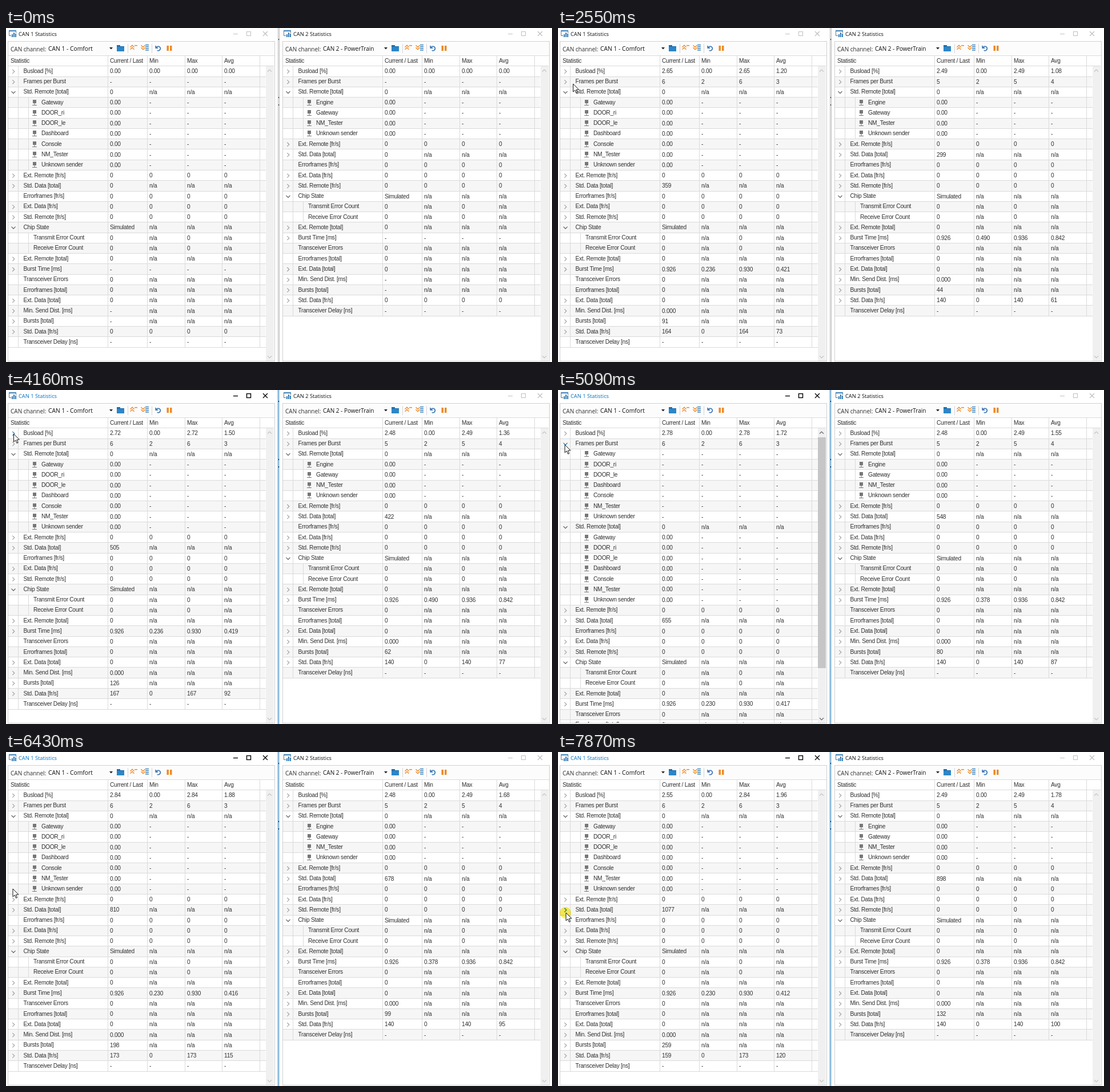
These frames come from a looping animation (956 by 586 pixels, 8000 ms). An HTML page with a canvas:

```html
<!DOCTYPE html>
<html>
<head>
<meta charset="utf-8">
<title>CAN Statistics</title>
<style>
html, body { margin: 0; width: 956px; height: 586px; overflow: hidden; background: #fff; }
canvas { display: block; }
</style>
</head>
<body>
<canvas id="stage" width="956" height="586"></canvas>
<script>
const ctx = document.getElementById('stage').getContext('2d');
const LOOP = 8000, ROW = 18.27, TOP = 48;
const BLUE = '#0072c6', ORANGE = '#f08a24', LINE = '#dadada';
const TABLE_FONT = '10.2px "Liberation Sans", Arial, sans-serif';
const uiFont = size => `${size}px "Open Sans", "Noto Sans", sans-serif`;

// Values arrive once per period; the measurement is stopped during the last one
const FIRST_UPDATE = 300, PERIOD = 1030, RATE_SAMPLES = 7, STOP = 7.65;
// Sample numbers at which load and rate change direction
const KEYS = [1, 2, 3, 6, 7];

// Counters are [value at sample 2, speed, acceleration]
const channels = [
  {
    x: 0, title: 'CAN 1 Statistics', name: 'CAN 1 - Comfort', nameSize: 10.3,
    nodes: ['Gateway', 'DOOR_ri', 'DOOR_le', 'Dashboard', 'Console', 'NM_Tester', 'Unknown sender'],
    load: [0, 2.144, 2.654, 2.844, 2.554], rate: [0, 129, 164, 173, 159],
    total: [218, 138.7, 2.35], bursts: [57, 33.8, .35],
    frames: [6, 2, 6, 3], burst: { max: .93, min: [.236, .23], avg: [.423, .412] }
  },
  {
    x: 481, title: 'CAN 2 Statistics', name: 'CAN 2 - PowerTrain', nameSize: 10,
    nodes: ['Engine', 'Gateway', 'NM_Tester', 'Unknown sender'],
    load: [0, 1.85, 2.487, 2.48, 2.487], rate: [0, 103, 140, 140, 140],
    total: [179, 118.5, 1.55], bursts: [27, 16.9, .3],
    frames: [5, 2, 5, 4], burst: { max: .936, min: [.49, .378], avg: [.842, .842] }
  }
];

const clicks = [[3170, 3230], [4090, 4160], [4950, 5090], [5500, 5640], [6720, 6860], [7190, 7260], [7870, 8000]];
const expanded = { load: [3430, 4160], frames: [5090, 5570], remote: [6860, 7260] };
const pointerStart = [300, 558];
const moves = [
  { from: 1810, to: 2550, x: 26.5, y: 98 },
  { from: 2620, to: 2950, x: 13.5, y: 77 },
  { from: 4360, to: 4880, x: 12, y: 96 },
  { from: 5880, to: 6570, x: 12, y: 257 },
  { from: 7560, to: 7800, x: 14, y: 282 }
];

const within = (t, [a, b]) => t >= a && t < b;
const clamp01 = v => Math.min(1, Math.max(0, v));
const mix = (a, b, u) => a + (b - a) * u;
const same = v => [v, v, v, v];
const na = v => [v, 'n/a', 'n/a', 'n/a'];

function rect(color, x, y, w, h) {
  ctx.fillStyle = color;
  ctx.fillRect(x, y, w, h);
}
function path(color, points, width = 1) {
  ctx.beginPath();
  points.forEach(([x, y]) => ctx.lineTo(x, y));
  ctx.strokeStyle = color;
  ctx.lineWidth = width;
  ctx.stroke();
}
function text(str, x, y, font = TABLE_FONT, color = '#303030') {
  ctx.font = font;
  ctx.letterSpacing = font === TABLE_FONT ? '-0.28px' : '0px';
  ctx.fillStyle = color;
  ctx.fillText(str, x, y);
}
// Chevron turned by quarter steps: 0 right, 1 down, 3 up
function chevron(x, y, quarter, color, width = 1) {
  ctx.save();
  ctx.translate(x, y);
  ctx.rotate(quarter * Math.PI / 2);
  path(color, [[-1.7, -3.5], [1.8, 0], [-1.7, 3.5]], width);
  ctx.restore();
}

function sample(values, n) {
  return KEYS.slice(1).reduce((v, key, i) =>
    mix(v, values[i + 1], clamp01((n - KEYS[i]) / (key - KEYS[i]))), values[0]);
}
// [current, min, max, avg] over all samples so far
function series(values, n, digits, factor = 1) {
  const count = Math.max(1, Math.min(n, RATE_SAMPLES));
  const seen = Array.from({ length: count }, (_, i) => sample(values, i + 1));
  const avg = seen.reduce((a, b) => a + b) / (count + 1);
  return [seen[count - 1], 0, Math.max(...seen), avg].map(v => (v * factor).toFixed(digits));
}
function counter([base, speed, gain], n) {
  const m = Math.min(n, STOP) - 2;
  return Math.round(base + speed * m + gain * m * m);
}
function burstTimes({ max, min, avg }, n) {
  const current = n > 2 ? .926 : max;
  return [current, min[n > 4 ? 1 : 0], max, mix(...avg, (n - 2) / 6)].map(v => v.toFixed(3));
}

function tableRows(ch, n, t) {
  const rows = [];
  const add = (label, values, icon = '', depth = 0) => rows.push({ label, values, icon, depth });
  const group = (label, values, open, childValues) => {
    add(label, values, open ? 'open' : 'closed');
    if (open) ch.nodes.forEach((name, j) => add(name, childValues(j), 'node', 1));
  };
  const isOpen = key => ch.x === 0 && within(t, expanded[key]);

  group('Busload [%]', series(ch.load, n, 2), isOpen('load'), j => series(ch.load, n, 2, (6 - j) / 21));
  group('Frames per Burst', n ? ch.frames : same('-'), isOpen('frames'), () => same('-'));
  group('Std. Remote [total]', na(0), true, () => ['0.00', '-', '-', '-']);
  group('Ext. Remote [fr/s]', same(0), isOpen('remote'), () => same('0.00'));
  add('Std. Data [total]', na(n ? counter(ch.total, n) : 0), 'closed');
  add('Errorframes [fr/s]', same(0));
  add('Ext. Data [fr/s]', same(0), 'closed');
  add('Std. Remote [fr/s]', same(0), 'closed');
  add('Chip State', na('Simulated'), 'open');
  add('Transmit Error Count', [0, 'n/a', 0, 'n/a'], '', 1);
  add('Receive Error Count', [0, 'n/a', 0, 'n/a'], '', 1);
  add('Ext. Remote [total]', na(0), 'closed');
  add('Burst Time [ms]', n ? burstTimes(ch.burst, n) : same('-'), 'closed');
  add('Transceiver Errors', na(0));
  add('Errorframes [total]', na(0));
  add('Ext. Data [total]', na(0), 'closed');
  add('Min. Send Dist. [ms]', na(n ? '0.000' : '-'), 'closed');
  add('Bursts [total]', na(n ? counter(ch.bursts, n) : '-'), 'closed');
  add('Std. Data [fr/s]', series(ch.rate, n, 0), 'closed');
  add('Transceiver Delay [ns]', same('-'));
  return rows;
}

function drawTitle(ch, active) {
  const tone = active ? '#000' : '#c0c0c0';
  rect('#3b82b8', 5, 4, 13, 2);
  path('#6b7780', [[5.5, 6], [5.5, 13.5], [9, 13.5]]);
  path('#6b7780', [[17.5, 6], [17.5, 9]]);
  rect('#2f79b5', 10, 11, 2, 5);
  rect('#2f79b5', 13, 8, 2, 8);
  rect('#2f79b5', 16, 10, 2, 6);
  text(ch.title, 22, 14, uiFont(9.3), active ? BLUE : '#111');
  path(tone, [[398, 10.5], [406, 10.5]], active ? 1.4 : 1);
  ctx.strokeRect(421.5, 6.5, 7, 7);
  path(tone, [[450, 6], [458, 14]], 1.2);
  path(tone, [[458, 6], [450, 14]], 1.2);
}

function drawToolbar(ch) {
  rect('#fcfcfc', 4, 24, 466, 24);
  text('CAN channel:', 8, 41, uiFont(10));
  text(ch.name, 74, 40, uiFont(ch.nameSize), '#111');
  ctx.fillStyle = '#222';
  ctx.beginPath();
  ctx.moveTo(181, 34);
  ctx.lineTo(187, 34);
  ctx.lineTo(184, 37.5);
  ctx.fill();
  rect('#1f6fae', 194, 30, 6, 3);
  rect('#2b86c8', 194, 32, 13, 9);
  rect('#1f6fae', 194, 32, 13, 1);
  for (const x of [213, 255]) rect('#d4d4d4', x, 28, 1, 16);
  for (const [x, quarter] of [[221, 3], [240, 1]]) {
    chevron(x, 32, quarter, ORANGE, 1.4);
    chevron(x, 36, quarter, ORANGE, 1.4);
  }
  rect(ORANGE, 225, 30, 5, 1.5);
  for (let y = 29; y < 40; y += 3) rect('#2b78b4', 244, y, 6, 1.4);
  ctx.beginPath();
  ctx.arc(266.5, 36, 3.8, Math.PI * 1.15, Math.PI * 2.65);
  ctx.strokeStyle = '#2b6cb0';
  ctx.lineWidth = 1.6;
  ctx.stroke();
  path('#2b6cb0', [[262, 31], [262.3, 35.3], [266.3, 35]], 1.5);
  rect(ORANGE, 281.5, 31, 3.5, 9);
  rect(ORANGE, 287, 31, 3.5, 9);
}

function drawIcon(icon, y, hover) {
  const mid = Math.round(y + 9.6);
  if (icon === 'node') {
    rect('#777', 47, mid - 5, 6, 6);
    rect('#777', 49.5, mid + 1, 1, 4);
    rect('#777', 46, mid + 4, 8, 1);
  } else if (icon) {
    const open = icon === 'open';
    chevron(13, y + 10.1, open ? 1 : 0, hover ? BLUE : open ? '#555' : '#9a9a9a', 1.1);
  }
}

function drawTable(rows, pointer) {
  const columns = [178, 247, 313, 378, 444];
  const overflow = rows.length > 28;
  ctx.save();
  ctx.beginPath();
  ctx.rect(3, TOP, 467, 537);
  ctx.clip();
  rect(LINE, 4, TOP, 466, 1);
  rect(LINE, 4, Math.round(TOP + ROW), 465, 1);
  ['Statistic', 'Current / Last', 'Min', 'Max', 'Avg'].forEach((s, i) => text(s, i ? columns[i - 1] + 4 : 8, 61));

  rows.forEach((row, i) => {
    const y = TOP + ROW * (i + 1), top = Math.round(y), height = Math.round(y + ROW) - top;
    if (i % 2) rect('#f6f6f6', 4, top + 1, 450, height - 1);
    rect(LINE, 4, top + height, 451, 1);
    rect(LINE, 21, top, 1, height);
    if (row.depth) rect(LINE, 39, top, 1, height);
    drawIcon(row.icon, y, pointer && pointer.x < 21 && within(pointer.y, [y, y + ROW]));
    text(row.label, row.icon === 'node' ? 62 : row.depth ? 48 : 30.5, Math.round(y + 12.6));
    row.values.forEach((v, c) => text(v, columns[c] + 4, Math.round(y + 13.1)));
  });

  const end = Math.min(584, Math.round(TOP + ROW * (rows.length + 1)));
  for (const x of columns) rect(LINE, x, TOP, 1, end - TOP);

  const arrow = overflow ? '#505050' : '#bdbdbd';
  rect('#f0f0f0', 455, 67, 14, 517);
  if (overflow) rect('#c6c6c6', 455, 83, 14, 405);
  chevron(461.5, 75, 3, arrow, 1.1);
  chevron(461.5, 577, 1, arrow, 1.1);
  ctx.restore();
  ctx.strokeStyle = '#d0d0d0';
  ctx.lineWidth = 1;
  ctx.strokeRect(3.5, 23.5, 467, 561);
}

function pointerAt(t) {
  if (t < moves[0].from) return null;
  let [x, y] = pointerStart;
  for (const move of moves) {
    const u = clamp01((t - move.from) / (move.to - move.from)), eased = u * u * (3 - 2 * u);
    x = mix(x, move.x, eased);
    y = mix(y, move.y, eased);
  }
  return { x, y };
}

function drawPointer({ x, y }, pressed) {
  if (pressed) {
    ctx.globalCompositeOperation = 'multiply';
    ctx.fillStyle = '#fbee58';
    ctx.beginPath();
    ctx.arc(x - 1, y, 10, 0, 7);
    ctx.fill();
    ctx.globalCompositeOperation = 'source-over';
  }
  ctx.save();
  ctx.translate(x, y);
  ctx.beginPath();
  [[0, 0], [0, 14], [3.2, 11], [5.5, 16.3], [7.6, 15.4], [5.4, 10.3], [9.8, 10]].forEach(p => ctx.lineTo(...p));
  ctx.closePath();
  ctx.fillStyle = '#fff';
  ctx.fill();
  ctx.strokeStyle = '#111';
  ctx.lineWidth = 1;
  ctx.stroke();
  ctx.restore();
}

function draw(now) {
  const t = now % LOOP;
  const n = Math.max(0, Math.floor((t - FIRST_UPDATE) / PERIOD) + 1);
  const pointer = pointerAt(t);
  const active = [t >= 3170, within(t, [70, 400])];
  rect('#fff', 0, 0, 956, 586);
  channels.forEach((ch, i) => {
    ctx.save();
    ctx.translate(ch.x, 0);
    drawTitle(ch, active[i]);
    drawToolbar(ch);
    drawTable(tableRows(ch, n, t), i ? null : pointer);
    ctx.restore();
    rect(active[i] ? BLUE : '#b4b4b4', 476 + 2 * i, 0, 1, 586);
  });
  for (const y of [19, 121, 134]) rect('#444', 477, y, 1, 2);
  if (pointer) drawPointer(pointer, clicks.some(c => within(t, c)));
  requestAnimationFrame(draw);
}
requestAnimationFrame(draw);
</script>
</body>
</html>
```
